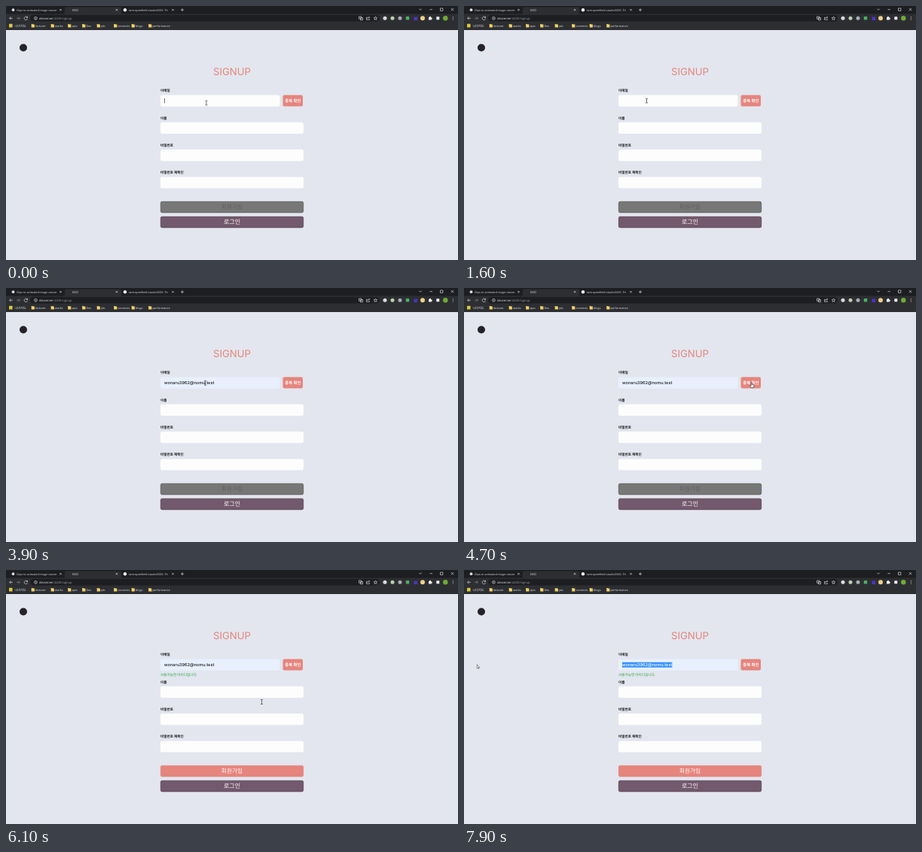
These frames come from a looping animation (600 by 338 pixels, 8000 ms). An HTML page:

```html
<!DOCTYPE html>
<html lang="ko">
<head>
<meta charset="utf-8">
<style>
  html, body { margin: 0; width: 100%; height: 100%; overflow: hidden; background: #e3e6ee; }
  svg { display: block; width: 100vw; height: 100vh; }
  text { font-family: "Open Sans", "Noto Sans CJK KR", "Noto Sans CJK", sans-serif; text-rendering: geometricPrecision; white-space: pre; }
  .form text { font-family: Inter, "Noto Sans CJK KR", "Noto Sans CJK", sans-serif; }
  .line { fill: none; stroke: #d5d6d9; stroke-width: .7; }
</style>
</head>
<body>
<svg id="stage" viewBox="0 0 600 338" preserveAspectRatio="none">
  <g id="browser"></g>
  <g id="form" class="form"></g>
  <g id="pointer">
    <path id="beam" d="M-1.5-3H-.4L0-2.6L.4-3H1.5M0-2.6V2.6M-1.5 3H-.4L0 2.6L.4 3H1.5" fill="none" stroke="#333" stroke-width=".7"/>
    <path id="arrow" d="M-.7-2.2V3L.5 1.9L1.3 3.5L2 3.1L1.3 1.6H2.8Z" fill="#fff" stroke="#222" stroke-width=".5"/>
    <path id="hand" d="M-.8-2.6Q-.2-3.3.3-2.6V-.3L2.6.3Q3.2.6 3 1.5L2.4 4.3H-.5L-2.4 1.4Q-2.2.5-.8 1.5Z" fill="#fff" stroke="#222" stroke-width=".6"/>
  </g>
</svg>
<script>
const NS = 'http://www.w3.org/2000/svg';
const $ = id => document.getElementById(id);
let layer = $('browser');

function add(tag, attrs, content) {
  const el = document.createElementNS(NS, tag);
  for (const k in attrs) el.setAttribute(k, attrs[k]);
  if (content) el.textContent = content;
  return layer.appendChild(el);
}
const rect = (x, y, width, height, fill, rx = 0, more) => add('rect', { x, y, width, height, fill, rx, ...more });
const dot = (cx, cy, r, fill) => add('circle', { cx, cy, r, fill });
const line = d => add('path', { d, class: 'line' });
const label = (x, y, size, fill, s, more) => add('text', { x, y, 'font-size': size, fill, ...more }, s);
const cross = (x, y, r) => line(`M${x - r} ${y - r}l${2 * r} ${2 * r}m0 ${-2 * r}l${-2 * r} ${2 * r}`);

// Browser window
rect(0, 0, 600, 11, '#1d1e21');
rect(0, 10.5, 600, 21.7, '#2d2e32');
rect(78, 1.5, 75, 12, '#2d2e32', 2);
rect(32, 12, 464, 8.6, '#1d1e21', 4.3);
dot(9.5, 5.2, 1.9, '#d8d8da');
label(14, 6.7, 3.65, '#dcdde0', 'Clips to animated image conver');
label(88, 6.7, 4, '#e8e8ea', 'KEO');
dot(158, 5.2, 2.2, '#f2f2f2');
label(163, 6.7, 3.75, '#dcdde0', 'tam-openfield-studio/KEO: Th');
for (const x of [72.5, 147, 221.5]) cross(x, 5.2, 1.2);
line('M232 5.2h4m-2-2v4');
line('M548.5 3.7l1.6 1.6 1.6-1.6M562.5 4.7h3.4M576.5 3h3.4v3.4h-3.4z');
cross(592.5, 4.7, 1.7);
line('M9 16.3H4.6m2-2l-2 2 2 2');
line('M14 16.3h4.4m-2-2l2 2-2 2').setAttribute('opacity', .5);
line('M28.3 15.3a2.2 2.2 0 1 0 .2 1.7M28.5 13.8v1.8h-1.8');
line('M41.3 16.3a1.9 1.9 0 1 0-3.8 0 1.9 1.9 0 1 0 3.8 0M39.4 16v1.2M39.4 15v.4');
label(44, 17.8, 4.1, '#e8e8ea', 'devserver').append(
  Object.assign(document.createElementNS(NS, 'tspan'), { textContent: ':4200/signup' }));
layer.lastChild.lastChild.setAttribute('fill', '#9a9ba0');
line('M468.5 14h3.2v3.2h-3.2zM470.5 15.5h3v3.2h-3z');
line('M480 15.3h-1.5v3h4v-1.2M480 17q.2-2 2.5-2m-1-1.2l1.2 1.2-1.2 1.2');
line('M490.5 14l.7 1.5 1.6.2-1.2 1.1.3 1.6-1.4-.8-1.4.8.3-1.6-1.2-1.1 1.6-.2z');
dot(503, 16.2, 2.5, '#d9dbe0');
dot(513, 16.2, 2.5, '#bcd0ad');
dot(523, 16.2, 2.5, '#a9adb4');
rect(530.8, 14, 4.4, 4.4, '#4caf63');
rect(541.5, 14.5, 4.5, 4.5, '#4b35c7');
dot(553, 16.2, 3, '#efd08a');
rect(561, 14.8, 3.8, 3.8, '#f0f0f2', .6);
dot(563, 14.6, .9, '#f0f0f2');
dot(565, 16.7, .9, '#f0f0f2');
rect(571.3, 14.2, 4, 4, '#f0f0f2', .4);
dot(583.3, 16.2, 3.2, '#6fab35');
for (const y of [14.4, 16.2, 18]) dot(593.3, y, .5, '#ddd');

// Bookmarks
rect(4, 23.8, 4.6, 4.8, '#d9c93d', .6);
label(11.5, 27.6, 4.2, '#e2e2e5', '나라지도');
[[39, 'lecturer'], [65, 'works'], [87.5, 'apis'], [106.5, 'Dev'], [126, 'job'],
 [148.5, 'connects'], [172, 'blogs'], [194.5, 'performance']].forEach(([x, s]) => {
  add('path', { d: `M${x - 5.3} 24h1.6l.6.6h2v3.8h-4.2z`, fill: '#f4d166' });
  label(x, 27.6, 3.8, '#e2e2e5', s);
});

// Page
layer = $('form');
rect(0, 32, 600, 306, '#e3e6ee');
dot(23, 55.5, 5, '#25222a');
const middle = { 'text-anchor': 'middle' };
const bold = { 'font-weight': 700 };
label(300, 92.2, 13.2, '#e5857d', 'SIGNUP', middle);
[['이메일', 114.4], ['이름', 150.7], ['비밀번호', 187], ['비밀번호 재확인', 223.3]].forEach(([s, y], i) => {
  label(205, y, 4.6, '#15151a', s, bold);
  if (i) rect(205, y + 4.1, 190, 15.2, '#fdfdfe', 2.5);
});
const field = rect(205, 118.5, 158.5, 15.2, '#fdfdfe', 2.5);
rect(367.5, 118.6, 26.5, 15, '#e5857d', 2);
label(380.8, 127.6, 5.4, '#fff', '중복 확인', { ...middle, ...bold });
const notice = label(205, 140.6, 4.6, '#1c9a3c', '사용가능한 아이디입니다.', { 'font-weight': 500 });
const join = rect(205.3, 260.3, 189.4, 14.6, '#777', 2, { 'stroke-width': .7 });
const joinText = label(300, 270.2, 7.7, '#5e5e5e', '회원가입', { ...middle, 'font-weight': 500 });
rect(205.3, 280.3, 189.4, 14.6, '#73596d', 2, { stroke: '#5a4054', 'stroke-width': .7 });
label(300, 290.2, 8, '#fff', '로그인', { ...middle, 'font-weight': 500 });

const mail = 'wonaru3962@nomu.test';
const mark = rect(210, 122.7, 0, 7, '#3390ff');
const entry = label(210, 128, 5.6, '#1a1a1f', '', { 'font-weight': 500 });
const [plain, picked] = ['#1a1a1f', '#fff'].map(fill => {
  const span = document.createElementNS(NS, 'tspan');
  span.setAttribute('fill', fill);
  return entry.appendChild(span);
});
const caret = rect(210, 122.9, .6, 6.4, '#222');

// Pointer stops: time, x, y
const path = [[300, 266, 129], [1100, 242.5, 126], [3700, 242.5, 126], [4500, 382, 128.5],
  [5300, 382, 128.5], [6000, 339.5, 175.5], [6200, 339.5, 175.5], [6800, 286, 128],
  [7100, 286, 128], [7700, 18, 128]];

function pointerAt(t) {
  const i = path.findIndex(p => p[0] > t);
  if (i < 1) return (i ? path[path.length - 1] : path[0]).slice(1);
  const [a, b] = [path[i - 1], path[i]];
  const u = (t - a[0]) / (b[0] - a[0]);
  const k = u * u * (3 - 2 * u);
  return [a[1] + (b[1] - a[1]) * k, a[2] + (b[2] - a[2]) * k];
}
const show = (el, on) => el.setAttribute('visibility', on ? 'visible' : 'hidden');

function draw(t) {
  const [x, y] = pointerAt(t);
  const filled = t >= 3600;
  const valid = t >= 5100;
  const typed = filled ? mail.length : [2500, 2750, 3000].filter(k => t >= k).length;

  plain.textContent = mail.slice(0, typed);
  picked.textContent = '';
  const end = 210 + (typed ? entry.getComputedTextLength() : 0);
  let cut = typed, left = end;
  if (t > 7100) {
    while (cut > 0 && left > x) left = 210 + (--cut ? entry.getSubStringLength(0, cut) : 0);
  }
  plain.textContent = mail.slice(0, cut);
  picked.textContent = mail.slice(cut, typed);
  mark.setAttribute('x', left);
  mark.setAttribute('width', end - left);

  caret.setAttribute('x', end);
  show(caret, !filled && (t >= 2500 || t % 1000 < 500));
  field.setAttribute('fill', filled ? '#e8f0fe' : '#fdfdfe');
  show(notice, valid);
  join.setAttribute('fill', valid ? '#e5857d' : '#777');
  join.setAttribute('stroke', valid ? '#e5857d' : '#555');
  joinText.setAttribute('fill', valid ? '#fff' : '#5e5e5e');

  const kind = x < 205 ? 'arrow' : x > 367 && y < 134 ? 'hand' : 'beam';
  for (const id of ['beam', 'arrow', 'hand']) show($(id), id === kind);
  $('pointer').setAttribute('transform', `translate(${x} ${y})`);
}

const start = performance.now();
(function tick() {
  draw((performance.now() - start) % 8000);
  requestAnimationFrame(tick);
})();
</script>
</body>
</html>
```
